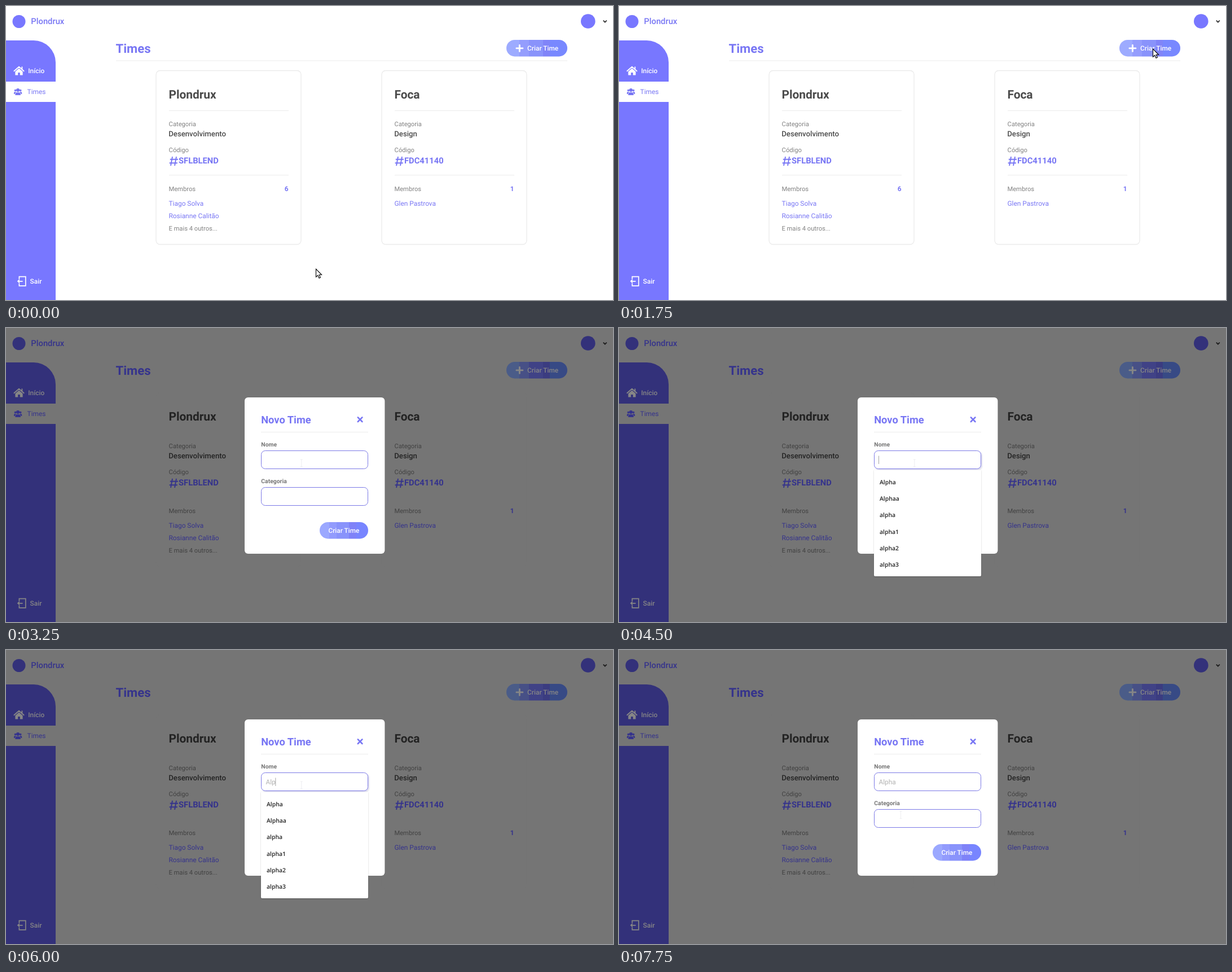
An HTML page that plays this animation: 1076 px wide and 521 px high, repeating every 8000 ms.

```html
<!DOCTYPE html>
<html lang="pt-BR">
<head>
<meta charset="utf-8">
<title>Times</title>
<style>
  html, body { margin: 0; width: 100%; height: 100%; overflow: hidden; background: #fff; }
  svg {
    display: block; width: 1076px; height: 521px;
    font-family: Roboto, Arial, sans-serif; text-rendering: geometricPrecision;
    --bg: #fff; --side: #7877ff; --accent: #7876f4; --ink: #4b4b4b; --grey: #828282;
    --light: #fff; --line: #ebebeb; --dark: #333;
    --b1: #9dabff; --b2: #949dfd; --b3: #8993fb; --b4: #8084f8; --b5: #7888ff;
  }
  svg.dim {
    --bg: #757575; --side: #33317a; --accent: #35338c; --ink: #232323; --grey: #414141;
    --light: #868686; --line: #757575; --dark: #1c1c1c;
    --b1: #4a5c88; --b2: #475086; --b3: #404286; --b4: #3b3c80; --b5: #374a85;
  }
  .bg { fill: var(--bg); }
  .side { fill: var(--side); }
  .accent { fill: var(--accent); }
  .ink { fill: var(--ink); }
  .grey { fill: var(--grey); }
  .light { fill: var(--light); }
  .line { fill: none; stroke: var(--line); }
  .m { font-weight: 500; }
  .b { font-weight: 700; }
  .s11 { font-size: 11.2px; }
  .s12 { font-size: 11.9px; }
  .s13 { font-size: 13.2px; }
  .s15 { font-size: 14.75px; }
  .s21 { font-size: 20.9px; }
  .s22 { font-size: 22.1px; }
  .field { fill: #fff; stroke: #7b79e6; }
  .label { font-size: 10.4px; font-weight: 700; fill: #777; }
  .focus { filter: drop-shadow(2px 2px 1px #dcdcec); }
  #list { filter: drop-shadow(0 1px 1px rgba(0, 0, 0, .2)); }
  #list text { font: 600 10.4px "Open Sans", "Noto Sans", sans-serif; fill: #222; }
</style>
</head>
<body>
<svg id="stage" viewBox="0 0 1076 521">
  <defs id="defs"></defs>
  <rect class="bg" width="1076" height="521"/>

  <circle class="side" cx="23" cy="27.5" r="11.5"/>
  <text class="accent m s15" x="44.3" y="32.3">Plondrux</text>
  <circle class="side" cx="1031.8" cy="27" r="12.8"/>
  <path d="M1058.8 25.6l3 3 3-3" fill="none" stroke="var(--dark)" stroke-width="1.9"/>

  <path class="side" d="M0 61H49A39 39 0 0 1 88 100V521H0Z"/>
  <rect class="bg" y="134" width="89" height="36"/>
  <g class="light">
    <path d="M23 110.6l-6.6 5.6v6.2h4.8v-4.5h3.6v4.5h4.8v-6.2z"/>
    <path d="M14.4 115.2l8.6-7.4 8.6 7.4M28.4 108.2v3.6" fill="none"
      stroke="var(--light)" stroke-width="1.9" stroke-linecap="round" stroke-linejoin="round"/>
    <text class="m s12" x="39.2" y="119.3">Início</text>
    <text class="m s12" x="42.6" y="492.2">Sair</text>
  </g>
  <path d="M23.4 484v-4.3h11.4v16.2h-11.4v-4.3M21 487.8h8.6M24 484.9l-3 2.9 3 2.9"
    fill="none" stroke="var(--light)" stroke-width="1.7"/>
  <g class="accent">
    <circle cx="21.1" cy="149" r="3.1"/>
    <circle cx="16.5" cy="149.6" r="1.8"/>
    <circle cx="25.7" cy="149.6" r="1.8"/>
    <path d="M16.4 158v-1.6a3.4 3.4 0 0 1 3.4-3.4h2.6a3.4 3.4 0 0 1 3.4 3.4V158z"/>
    <path d="M14 156v-2a2 2 0 0 1 2-2h1.6l-2 4zM28.2 156v-2a2 2 0 0 0-2-2h-1.6l2 4z"/>
    <text class="s12" x="37.6" y="156.3">Times</text>
    <text class="b s22" x="194.6" y="83">Times</text>
  </g>
  <path class="line" d="M195 97H995"/>

  <rect x="887" y="60" width="108" height="29.4" rx="14.7" fill="url(#top)"/>
  <path d="M910.4 69.4v11M904.9 74.9h11" stroke="var(--light)" stroke-width="2.9" stroke-linecap="round"/>
  <text class="light m s12" x="924" y="79.1">Criar Time</text>

  <g id="cards"></g>

  <g id="modal">
    <rect x="423" y="123" width="248.4" height="277" rx="6" fill="#fff"/>
    <text class="b" x="452.2" y="169" font-size="18.3" fill="#7876f4">Novo Time</text>
    <path d="M623.8 158.4l7.6 7.6M631.4 158.4l-7.6 7.6" stroke="#7876f4" stroke-width="2.6" stroke-linecap="round"/>
    <path d="M452 184.5H642" stroke="#ebebeb"/>
    <text class="label" x="452.3" y="209.8">Nome</text>
    <rect id="name" class="field" x="452.5" y="217.5" width="189" height="32" rx="7"/>
    <text id="typed" class="s12" x="460.4" y="238.2" fill="#b2b2b2"></text>
    <rect id="caret" y="226.5" width="1" height="14.5" fill="#a4a4a4"/>
    <text class="label" x="452.3" y="274.7">Categoria</text>
    <rect class="field" x="452.5" y="282.5" width="189" height="32" rx="7"/>
    <rect x="556" y="344" width="86" height="29.4" rx="14.7" fill="url(#send)"/>
    <text class="m" x="571.5" y="363" font-size="11.8" fill="#fff">Criar Time</text>
    <g id="list"><path d="M452 251.500H642V438a2 2 0 0 1-2 2H454a2 2 0 0 1-2-2z" fill="#fff"/></g>
  </g>

  <path id="arrow" d="M0 0V14.200L3.300 11.200 5.500 16.200 7.900 15.200 5.700 10.300H10Z" fill="#fff" stroke="#000" stroke-width="1.1"/>
  <path id="beam" d="M-2-6.500H2M0-6.500V6.500M-2 6.500H2" fill="none" stroke="#ececf0" stroke-width=".9"/>
</svg>
<script>
const $ = id => document.getElementById(id);
const LOOP = 8000;

// Button fill in flat bands: [end of band, colour]
function bands(id, list) {
  let from = 0, stops = '';
  for (const [to, color] of list) {
    stops += `<stop offset="${from}" style="stop-color:${color}"/><stop offset="${to}" style="stop-color:${color}"/>`;
    from = to;
  }
  $('defs').innerHTML += `<linearGradient id="${id}">${stops}</linearGradient>`;
}
bands('top', [[.21, 'var(--b1)'], [.37, 'var(--b2)'], [.6, 'var(--b3)'], [.71, 'var(--b4)'], [1, 'var(--b5)']]);
bands('send', [[.2, '#9ba8ff'], [.35, '#929bfd'], [.6, '#8993fb'], [.76, '#7f82f8'], [1, '#7885ff']]);

function card(x, team) {
  const text = (cls, y, value, dx = 0, more = '') =>
    `<text class="${cls}" x="${dx}" y="${y}" ${more}>${value}</text>`;
  return `<g transform="translate(${x})">
    <rect class="line" x="-23" y="114.5" width="257" height="308" rx="7" stroke-width="1.3"/>
    <path class="line" d="M0 185.500H212M0 299.800H212"/>
    <path d="M6 267L3 283M13 267L10 283M1.800 271.800H16M.6 278.300H14.800"
      fill="none" stroke="var(--accent)" stroke-width="1.9"/>
    ${text('ink b s21', 164.3, team.title, -.6)}
    ${text('grey s11', 212.8, 'Categoria', -.4)}
    ${text('ink m s13', 230.6, team.kind, -.8)}
    ${text('grey s11', 259, 'Código', -.4)}
    ${text('accent b s15', 279.2, team.code, 17)}
    ${text('grey s11', 328, 'Membros', -.6)}
    ${text('accent b s12', 328.2, team.count, 211.6, 'text-anchor="end"')}
    ${team.people.map((p, i) => text('accent s12', 354.2 + i * 21.8, p, -.5)).join('')}
    ${text('grey s11', 398, team.rest, -.6)}
  </g>`;
}
$('cards').innerHTML =
  card(289, { title: 'Plondrux', kind: 'Desenvolvimento', code: 'SFLBLEND', count: 6,
    people: ['Tiago Solva', 'Rosianne Calitão'], rest: 'E mais 4 outros...' }) +
  card(689, { title: 'Foca', kind: 'Design', code: 'FDC41140', count: 1,
    people: ['Glen Pastrova'], rest: '' });

$('list').innerHTML += ['Alpha', 'Alphaa', 'alpha', 'alpha1', 'alpha2', 'alpha3']
  .map((s, i) => `<text x="462" y="${276.8 + i * 29.25}">${s}</text>`).join('');

// Each row: start time, then the state held until the next row
const pointer = [
  [0, 'arrow', 549.5, 466], [250, 'arrow', 566, 431.5], [500, 'arrow', 614, 316],
  [750, 'arrow', 768, 118], [1000, 'arrow', 846, 92], [1250, 'arrow', 925, 66],
  [1500, 'arrow', 938, 74], [1750, 'arrow', 946.5, 76], [2500, 'arrow', 948, 70],
  [2750, 'arrow', 824, 126], [3000, 'arrow', 588, 207], [3250, 'beam', 523.8, 239.5],
  [7000, 'beam', 536.5, 218], [7250, 'arrow', 540, 197], [7500, 'beam', 514, 248],
  [7750, 'beam', 499.5, 292]
];
const typing = [[0, ''], [4750, 'A'], [5500, 'Al'], [6000, 'Alp'], [6500, 'Alpha']];
const caret = [[0, 0], [3500, 1], [4000, 0], [4500, 1], [4750, 0], [5250, 1], [7000, 0]];
const list = [[0, 0], [3500, 1], [4750, 0], [5500, 1], [7250, 0]];
const focus = [[0, 0], [3500, 1], [7250, 0]];
const modal = [[0, 0], [2250, 1]];

const at = (steps, t) => steps.findLast(s => s[0] <= t).slice(1);
const show = (id, on) => $(id).style.display = on ? '' : 'none';

function draw(t) {
  const open = !!at(modal, t)[0];
  $('stage').classList.toggle('dim', open);
  show('modal', open);
  show('list', at(list, t)[0]);
  show('caret', at(caret, t)[0]);
  $('name').classList.toggle('focus', !!at(focus, t)[0]);

  const [text] = at(typing, t);
  if ($('typed').textContent !== text) $('typed').textContent = text;
  $('caret').setAttribute('x', 460 + (text && open ? $('typed').getComputedTextLength() : 0));

  const [kind, x, y] = at(pointer, t);
  for (const id of ['arrow', 'beam']) show(id, id === kind);
  $(kind).setAttribute('transform', `translate(${x} ${y})`);
}

const start = performance.now();
function tick() {
  draw((performance.now() - start) % LOOP);
  requestAnimationFrame(tick);
}
tick();
</script>
</body>
</html>
```
